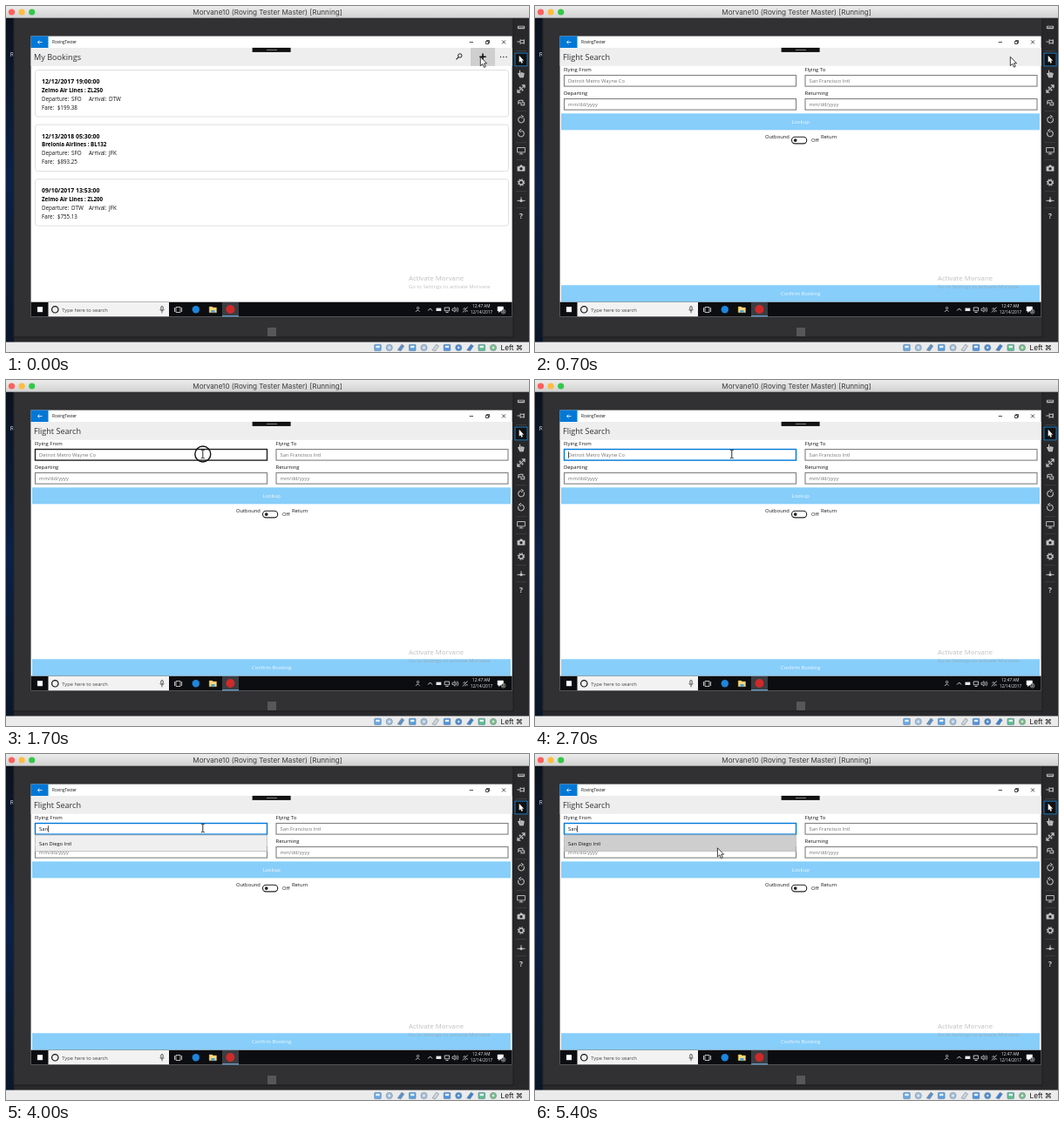
An HTML page that plays this animation: 600x397 px, repeating every 5.5 s.

```html
<!DOCTYPE html>
<html lang="en">
<head>
<meta charset="utf-8">
<title>Flight booking demo</title>
<style>
html, body { margin: 0; width: 100%; height: 100%; overflow: hidden; background: #2b2b2d; }
svg { display: block; width: 100vw; height: 100vh; }
text { font-family: "Open Sans", "Noto Sans", sans-serif; white-space: pre; }
.mac { font-family: Inter, Roboto, sans-serif; }
</style>
</head>
<body>
<svg id="stage" viewBox="0 0 600 397" preserveAspectRatio="none" xmlns="http://www.w3.org/2000/svg"></svg>
<script>
const LOOP = 5500;
const stage = document.getElementById('stage');

const rect = (x, y, w, h, fill, more = '') =>
  `<rect x="${x}" y="${y}" width="${w}" height="${h}" fill="${fill}" ${more}/>`;
const circle = (x, y, r, fill, more = '') =>
  `<circle cx="${x}" cy="${y}" r="${r}" fill="${fill}" ${more}/>`;
const text = (x, y, size, str, fill = '#111', more = '') =>
  `<text x="${x}" y="${y}" font-size="${size}" fill="${fill}" ${more}>${str}</text>`;
const path = (d, stroke = '#c4c4c4', width = 1, fill = 'none') =>
  `<path d="${d}" fill="${fill}" stroke="${stroke}" stroke-width="${width}"/>`;
const at = (x, y, inner, scale = 1) => `<g transform="translate(${x} ${y}) scale(${scale})">${inner}</g>`;
const group = (id, inner) => `<g id="${id}">${inner}</g>`;
const fade = (id, ...colors) => `<linearGradient id="${id}" x2="0" y2="1">` +
  colors.map((c, i) => `<stop offset="${i / (colors.length - 1)}" stop-color="${c}"/>`).join('') + '</linearGradient>';
const MID = 'text-anchor="middle"';
const BOLD = 'font-weight="700"';

function macBar() {
  const lights = ['#fc605c', '#fdbc40', '#34c84a'];
  return fade('bar', '#ececec', '#d2d2d2') +
    rect(0, 0, 600, 13.5, 'url(#bar)') + rect(0, 13, 600, .8, '#a5a5a5') +
    lights.map((c, i) => circle(6.5 + i * 11.6, 7, 3.6, c)).join('') +
    text(300, 10, 8.15, 'Morvane10 (Roving Tester Master) [Running]', '#3c3c3c', MID + ' class="mac"');
}

function tablet() {
  return fade('desk', '#0b121d', '#0b2148', '#0b1628') +
    rect(0, 13, 600, 373, '#28282a') +
    rect(0, 13, 9, 373, 'url(#desk)') +
    text(4.8, 58, 7, 'R', '#dfe6ee') +
    rect(8.5, 14, 573.5, 366, '#313133') +
    rect(8.5, 14, .8, 366, '#1a1a1c') +
    rect(8.5, 379.5, 573.5, 1, '#1a1a1c') +
    rect(581.5, 14, .8, 366, '#1c1c1e') +
    rect(300, 369, 10, 10, '#57575a');
}

function sideTools() {
  const spin = 'M3.2 -2A3.7 3.7 0 1 1 0 -3.7M0 -5.6L2.6 -3.7L0 -1.8';
  const tools = [
    [24.5, rect(-4.5, -2, 9, 4, '#b8b8b8', 'rx=".8"') + rect(-3.4, -1, 6.8, 1.2, '#333')],
    [41, path('M-5 0H-1M-1 -3V3M-1 -1.8H3.5V1.8H-1M3.5 -3V3')],
    [61.5, rect(-7.6, -8, 15.2, 16, '#111', 'stroke="#1a7fc9"') +
      path('M-2.3 -4.5V3L-.6 1.6L.6 4.4L1.8 3.8L.6 1.2H3Z', '#fff', .4, '#fff')],
    [78, path('M-1.6 1V-4.5M-1.6 -1L-3.6 -.4L-1.4 4H2.4L3.4 -.6L0 -1.4V1', '#c4c4c4', 1.2, '#b0b0b0')],
    [95, path('M-4 4L4 -4M-4.4 .8V4.4H-.8M.8 -4.4H4.4V-.8', '#c4c4c4', 1.3) + circle(-1.4, -1.4, 1.2, '#c4c4c4') + circle(1.6, 1.6, 1.2, '#c4c4c4')],
    [111, path('M-3.5 2V-1Q-3.5 -3 -1 -3H2V0H4V3H0V0H-3.5', '#c4c4c4', 1.1)],
    [130.5, path(spin, '#c4c4c4', 1.1)],
    [146.5, `<g transform="scale(-1 1)">${path(spin, '#c4c4c4', 1.1)}</g>`],
    [166, path('M-4.8 -3.8H4.8V2H-4.8ZM0 2V4.2M-2.5 4.2H2.5')],
    [186, path('M-4.5 -2H-2L-1 -3.6H1L2 -2H4.5V3.5H-4.5Z', '#c4c4c4', .6, '#c4c4c4') + circle(0, .7, 1.8, '#28282a')],
    [202.5, circle(0, 0, 2.7, 'none', 'stroke="#c4c4c4" stroke-width="1.5"') +
      circle(0, 0, 4, 'none', 'stroke="#c4c4c4" stroke-width="1.2" stroke-dasharray="1.6 1.54"')],
    [222, path('M-5 1.5H5M0 -3V1.5', '#c4c4c4') + circle(0, 1.5, 1.8, '#c4c4c4')],
    [241.5, text(0, 3, 9, '?', '#d0d0d0', MID + ' ' + BOLD)]
  ];
  return tools.map(([y, art]) => at(591, y, art, .92)).join('') +
    [51, 120.5, 156.5, 176, 212, 231.5].map(y => rect(585, y, 12, .6, '#4a4a4c')).join('');
}

function statusBar() {
  const tones = ['#6aa9e2', '#a3c3e0', '#5f8fc8', '#58a0de', '#a9c3db', '#cfd4da',
    '#4f92dc', '#4f8dd0', '#3f80cc', '#5cbd88', '#7cc08a'];
  const icon = (c, i) => at(426.5 + i * 13.25, 392,
    i % 3 === 1 ? circle(0, 0, 3.8, c, 'stroke="#6d8196" stroke-width=".6"') + circle(0, 0, 1.2, '#eef')
    : i % 3 === 2 ? path('M-4 3L1 -4L4 -2L0 4Z', '#6d8196', .6, c)
    : rect(-4, -3.8, 8, 7.6, c, 'rx="1" stroke="#5a7da2" stroke-width=".6"') + rect(-2.3, -2.3, 4.6, 2.5, '#eaf4fd'), .95);
  return rect(0, 385.6, 600, 11.4, '#ebebeb') +
    tones.map(icon).join('') +
    text(567.5, 395.2, 8.2, 'Left <tspan font-family="DejaVu Sans, sans-serif">⌘</tspan>', '#111', 'class="mac"');
}

function appFrame() {
  return rect(28.6, 34.6, 552, 321.8, '#fff') +
    rect(28.6, 34.6, 19.9, 13.4, '#0078d7') +
    path('M41.5 41.5H36.5M38.5 39.5L36.5 41.5L38.5 43.5', '#fff', .8) +
    text(53, 43.3, 4.7, 'RovingTester') +
    path('M531.7 41.5H536M550.5 40.5H553.5V43.5H550.5ZM551.5 40.5V39.5H554.5V42.5H553.5M569 39.4L573 43.4M573 39.4L569 43.4', '#222', .8) +
    rect(28.6, 48, 552, 20.8, '#eeeeee');
}

function card(y, date, flight, from, to, fare) {
  return at(0, y,
    rect(33.5, 0, 543, 53.5, '#fff', 'rx="3" stroke="#dcdcdc" stroke-width=".9"') +
    text(41, 15.5, 6.9, date, '#000', BOLD) +
    text(41, 25.4, 6.2, flight, '#000', BOLD) +
    text(41, 35.3, 6.2, 'Departure:') + text(75, 35.3, 6.3, from) +
    text(95, 35.3, 6.2, 'Arrival:') + text(118, 35.3, 6.3, to) +
    text(41, 45.2, 6.2, 'Fare:') + text(59, 45.2, 6.2, fare));
}

function bookings() {
  return text(32, 62.3, 9.1, 'My Bookings', '#333') +
    rect(533, 48, 28, 20.8, '#cfcfcf') +
    circle(520.8, 57, 2.2, 'none', 'stroke="#222" stroke-width="1"') +
    path('M519.2 58.7L516.5 61.4', '#222', 1.2) +
    path('M547 54.5V62M543.3 58.3H550.7', '#111', 1.6) +
    [567.5, 570.8, 574.1].map(x => circle(x, 58.5, .7, '#222')).join('') +
    card(73.5, '12/12/2017 19:00:00', 'Zelmo Air Lines : ZL250', 'SFO', 'DTW', '$199.38') +
    card(136.1, '12/13/2018 05:30:00', 'Brelonia Airlines : BL132', 'SFO', 'JFK', '$893.25') +
    card(198.7, '09/10/2017 13:53:00', 'Zelmo Air Lines : ZL200', 'DTW', 'JFK', '$755.13');
}

function field(x, y, label, hint, id = '') {
  return text(x, y - 4, 5.9, label) +
    rect(x + .5, y + .2, 266, 12.6, '#fff', `stroke="#808080" stroke-width="1.1" ${id && `id="${id}Box"`}`) +
    text(x + 5, y + 8.8, 5.8, hint, '#737373', id && `id="${id}Text"`);
}

function form() {
  return field(33, 79.3, 'Flying From', '', 'from') +
    field(309.5, 79.3, 'Flying To', 'San Francisco Intl') +
    field(33, 106.3, 'Departing', 'mm/dd/yyyy') +
    field(309.5, 106.3, 'Returning', 'mm/dd/yyyy') +
    rect(30, 123.3, 549, 19, '#87cefa') + text(304.7, 135, 5.8, 'Lookup', '#f4fbff', MID) +
    text(264, 152, 5.8, 'Outbound') +
    rect(294.5, 150.3, 17.2, 7.6, '#fff', 'rx="3.8" stroke="#222" stroke-width="1.1"') +
    circle(298.7, 154.1, 1.9, '#222') +
    text(317, 156.4, 5.8, 'Off') + text(328, 152, 5.8, 'Return') +
    rect(30, 320.3, 549, 19.2, '#87cefa') + text(304.7, 332.2, 5.8, 'Confirm Booking', '#f4fbff', MID) +
    `<rect id="caret" y="82.2" width=".7" height="7.6" fill="#111"/>`;
}

function dropdowns() {
  const names = ['Saint Catherine', 'Saint Exupery', 'Saint Yan', 'Saint Geoirs', 'Salvaza',
    'Salon', 'Saint Sauveur', 'Sacramento Mather', 'San Francisco Arpt'];
  return `<clipPath id="listClip"><rect x="33" y="92" width="267" height="157.3"/></clipPath>` +
    group('longList',
      rect(33.3, 93, 266, 156.4, '#efefef', 'stroke="#b8b8b8" stroke-width=".8"') +
      `<g clip-path="url(#listClip)">` +
      names.map((n, i) => text(38, 104.7 + i * 18.4, 5.8, n)).join('') + '</g>' +
      rect(297.2, 100, 1.6, 25, '#8a8a8a')) +
    group('shortList',
      rect(33.3, 93, 266, 18.4, '#efefef', 'id="row" stroke="#b8b8b8" stroke-width=".8"') +
      text(38, 104.7, 5.8, 'San Diego Intl'));
}

function taskbar() {
  const white = '#e8e8e8';
  return rect(28.6, 339.7, 552, 16.7, '#0c0d10') +
    rect(36, 345.2, 6, 6, '#fff') +
    rect(48.5, 340, 138.5, 16.2, '#f2f2f2') +
    circle(56.3, 348.3, 3.7, 'none', 'stroke="#111" stroke-width="1.2"') +
    text(64.3, 350.5, 5.75, 'Type here to search', '#444') +
    rect(177.8, 344.5, 2.4, 4.6, 'none', 'rx="1.2" stroke="#333" stroke-width=".8"') +
    path('M176.6 348.2Q179 352 181.4 348.2M179 350.4V352.4', '#333', .7) +
    path('M195 345.5H200V351.5H195ZM193.5 346V351M201.6 346V351', white, .8) +
    circle(217.8, 348.3, 4.2, '#1d86dd') +
    path('M233.2 345H236.5L237.5 346H241.5V351.8H233.2Z', '#e0b040', .4, '#f8d777') + rect(235.3, 349, 4.2, 2.8, '#4aa0d8') +
    rect(248, 340, 19, 16.4, '#3b3d42') + circle(257.4, 348, 5, '#cf2a2a') + rect(248, 355.3, 19, 1.1, '#76b9ed') +
    circle(472.6, 346.6, 1.2, 'none', `stroke="${white}" stroke-width=".7"`) +
    path('M470 351Q472 347.4 474.6 350.6', white, .7) +
    path('M484.2 349.5L486.6 347L489 349.5', white, .9) +
    rect(493.5, 346.6, 5.8, 3.4, white) +
    path('M503.2 346H508.6V349.8H503.2ZM504.5 351.5H507.5', white, .8) +
    path('M512 347.3H513.2L515 345.6V351.2L513.2 349.5H512ZM516.3 346.6Q517.6 348.4 516.3 350.2M517.8 345.6Q519.8 348.4 517.8 351.2', white, .7) +
    path('M524 351.5L529.5 345.5M524.3 348Q526 345.5 527 347.5M526.5 351Q528.5 348.5 529.8 350.2', white, .8) +
    text(545.3, 346.3, 4.7, '12:47 AM', white, MID) + text(545.5, 353.2, 4.8, '12/14/2017', white, MID) +
    path('M564 345H570.5V350H567L565.5 351.6V350H564Z', '#fff', .5, '#fff') +
    circle(570.6, 350.7, 2.4, '#333', 'stroke="#ddd" stroke-width=".5"') + text(570.6, 352.2, 3.6, '4', '#fff', MID);
}

stage.innerHTML = tablet() + sideTools() + appFrame() +
  group('bookings', bookings()) +
  group('search', text(32, 62.3, 9.1, 'Flight Search', '#333')) +
  group('form', form()) + dropdowns() +
  rect(282.6, 47.9, 44, 5, '#111') + rect(299, 50, 12, .7, '#aaa') +
  `<g opacity=".62">${text(462, 314.8, 7.8, 'Activate Morvane', '#999')}${text(462, 323.7, 5.85, 'Go to Settings to activate Morvane', '#999')}</g>` +
  taskbar() + macBar() + statusBar() +
  group('arrow', path('M0 0V10.2L2.4 8L4.2 11.9L5.9 11.1L4.2 7.4H7.2Z', '#111', .8, '#fff')) +
  group('beam', path('M-2 -4.8Q0 -4.8 0 -3.8Q0 -4.8 2 -4.8M0 -3.8V3.8M-2 4.8Q0 4.8 0 3.8Q0 4.8 2 4.8', '#111', .9)) +
  group('ring', circle(0, 0, 9, 'none', 'stroke="#111" stroke-width="1.4"'));

const el = {};
stage.querySelectorAll('[id]').forEach(n => el[n.id] = n);
const show = (name, on) => el[name].setAttribute('display', on ? 'inline' : 'none');

// Pointer stops: time, x, y
const stops = [[0, 544.3, 58.5], [300, 545.3, 58.3], [1000, 545.3, 58.3], [1500, 225.8, 85],
  [4200, 225.8, 85], [4500, 211, 98], [4620, 211, 98], [4800, 209.4, 107.8], [LOOP, 209.4, 107.8]];

function pointer(t) {
  const i = stops.findIndex(s => s[0] > t);
  const [t0, x0, y0] = stops[i - 1], [t1, x1, y1] = stops[i];
  const u = (t - t0) / (t1 - t0), k = u * u * (3 - 2 * u);
  return [x0 + (x1 - x0) * k, y0 + (y1 - y0) * k];
}

function draw(t) {
  const [x, y] = pointer(t);
  const typed = t < 3200 ? '' : t < 3300 ? 'S' : t < 3800 ? 'Sa' : 'San';
  const focus = t >= 1800;
  const overField = t >= 700 && y > 79 && y < 92.5 && x > 33 && x < 299;

  show('bookings', t < 300);
  show('search', t >= 300);
  show('form', t >= 700);
  show('longList', typed && typed.length < 3);
  show('shortList', typed === 'San');
  el.row.setAttribute('fill', y > 93 ? '#cecece' : '#efefef');

  el.fromBox.setAttribute('stroke', focus ? '#0078d7' : overField ? '#222' : '#808080');
  el.fromBox.setAttribute('stroke-width', focus || overField ? 1.4 : 1.1);
  el.fromText.textContent = typed || 'Detroit Metro Wayne Co';
  el.fromText.setAttribute('fill', typed ? '#111' : '#737373');
  show('caret', focus);
  el.caret.setAttribute('x', 38 + [0, 3.4, 6.7, 10.1][typed.length]);

  show('arrow', !overField);
  show('beam', overField);
  show('ring', t >= 1600 && t < 1800);
  for (const name of ['arrow', 'beam', 'ring'])
    el[name].setAttribute('transform', `translate(${x} ${y})`);
}

const start = performance.now();
function tick() {
  draw((performance.now() - start) % LOOP);
  requestAnimationFrame(tick);
}
tick();
</script>
</body>
</html>
```
